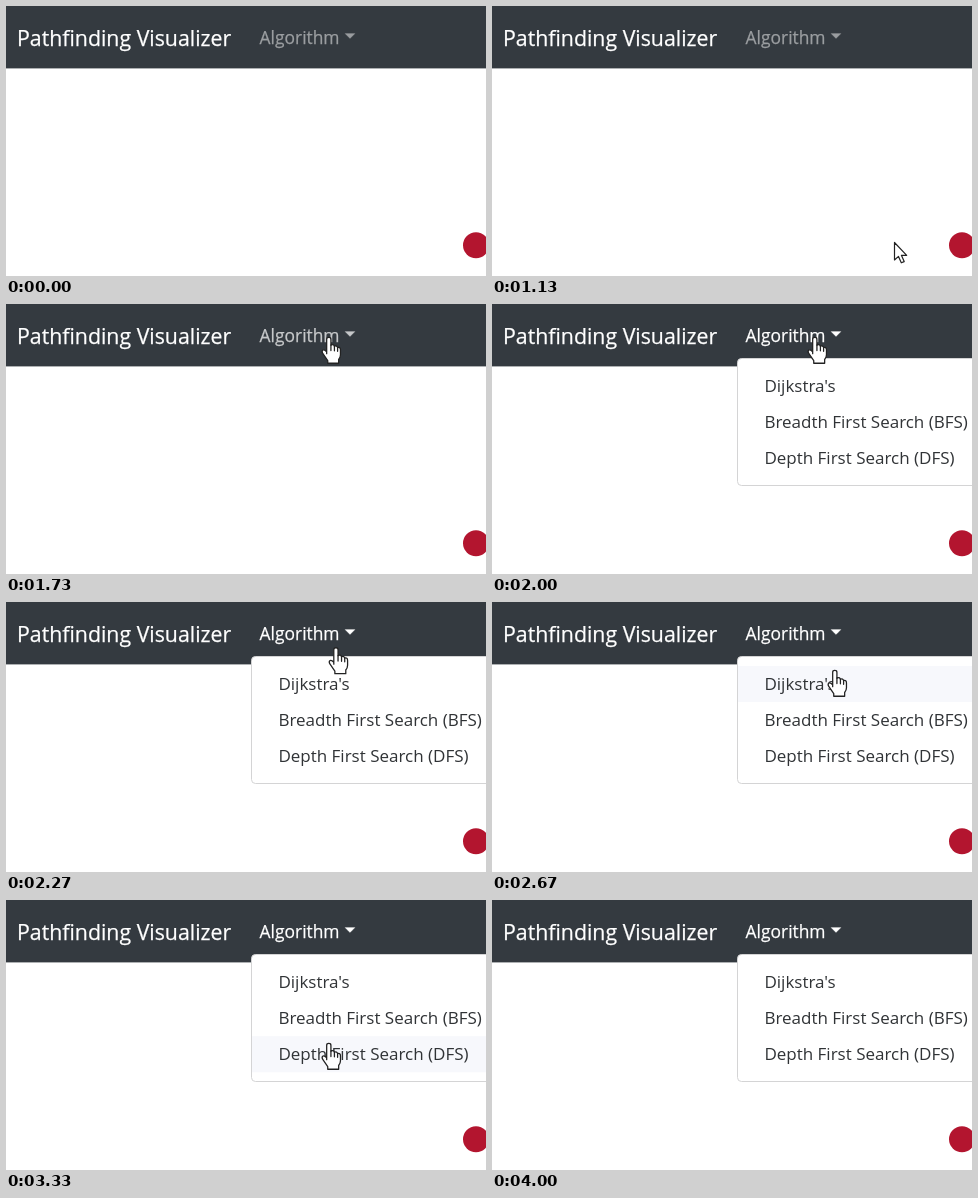
An HTML page that plays this animation: 480 px wide and 270 px high, repeating every 4070 ms.

```html
<!DOCTYPE html>
<html lang="en">
<head>
<meta charset="utf-8">
<title>Pathfinding Visualizer</title>
<style>
  html, body { margin: 0; width: 100%; height: 100%; overflow: hidden; background: #fff; }
  svg { display: block; width: 100%; height: 100%; font-family: "Open Sans", "Noto Sans", sans-serif; }
  .nav { fill: #fff; stroke: #fff; stroke-width: .25; }
  #menu text { font-size: 17px; fill: #303336; }
  #cursor { fill: #fff; stroke: #222; stroke-width: 1.2; stroke-linejoin: round; stroke-linecap: round; }
</style>
</head>
<body>
<svg viewBox="0 0 480 270">
  <rect width="480" height="62.4" fill="#343a40"/>
  <text class="nav" x="11" y="39.8" font-size="21.3">Pathfinding Visualizer</text>
  <g id="link" class="nav">
    <text x="253.6" y="37.8" font-size="17.4">Algorithm</text>
    <path d="M339 27.6h10l-5 5z"/>
  </g>
  <circle cx="470" cy="239.3" r="13" fill="#b3152f"/>
  <g id="menu">
    <rect x="245.5" y="54.5" width="250" height="127" rx="4" fill="#fff" stroke="#d4d4d5"/>
    <rect id="highlight" x="246" width="240" fill="#f7f8fc"/>
  </g>
  <g id="cursor">
    <path id="arrow" d="M.5.5V18l4-3.6 2.8 6.4 2.9-1.2-2.8-6.3h5.3z"/>
    <g id="hand" transform="translate(-.2 -1.2) scale(1.06)">
      <path d="M-2 15V1.5q0-2 2-2t2 2V7q2.5-1.5 3.3 1 2.4-1 3 1.2Q11 8.5 11 11.5V16q0 2.5-1.7 4.5V24H-1v-2.5l-4.7-6.7Q-7 12.5-5.5 11.5-4 10.8-2 13.3"/>
      <path fill="none" d="M2 7v5M5.3 8v4.3M8.3 9.2v3.6"/>
    </g>
  </g>
</svg>
<script>
const LOOP = 4070, STEP = 1000 / 15;
const ENTER = 1130, HOVER = 1600, SETTLE = 1730, OPEN = 2000, LEAVE = 3930;
const MENU_TOP = 64, ROW_HEIGHT = 36.1;
const LABELS = ["Dijkstra's", "Breadth First Search (BFS)", "Depth First Search (DFS)"];

// The pointer eases from stop to stop
const stops = [
  { at: ENTER, x: 402, y: 236 },
  { at: HOVER, x: 326, y: 17 },
  { at: SETTLE, x: 323, y: 35 },
  { at: OPEN, x: 323, y: 35 },
  { at: 2670, x: 343, y: 70 },
  { at: 3330, x: 323, y: 145 },
  { at: LEAVE, x: 322, y: 171 }
];

const el = id => document.getElementById(id);
const link = el("link"), menu = el("menu"), highlight = el("highlight");
const cursor = el("cursor"), arrow = el("arrow"), hand = el("hand");

const show = (node, visible) => { node.style.display = visible ? "" : "none"; };
const progress = (t, from, to) => Math.max(0, Math.min(1, (t - from) / (to - from)));
const ease = p => p * p * (3 - 2 * p);
const mix = (a, b, p) => a + (b - a) * p;

highlight.setAttribute("height", ROW_HEIGHT);
LABELS.forEach((label, row) => {
  const text = document.createElementNS("http://www.w3.org/2000/svg", "text");
  text.textContent = label;
  text.setAttribute("x", 272.4);
  text.setAttribute("y", MENU_TOP + 24.2 + row * ROW_HEIGHT);
  menu.append(text);
});

function pointerAt(t) {
  const next = stops.findIndex(stop => stop.at > t);
  const i = next < 0 ? stops.length - 1 : Math.max(1, next);
  const a = stops[i - 1], b = stops[i];
  const p = ease(progress(t, a.at, b.at));
  return [mix(a.x, b.x, p), mix(a.y, b.y, p)];
}

function draw(time) {
  // Motion advances 15 times per second, on times rounded to 10 ms
  const step = Math.floor((time % LOOP + 5) / STEP);
  const t = Math.round(step * STEP / 10) * 10;
  const present = t >= ENTER && t < LEAVE, open = t >= OPEN;
  const [x, y] = pointerAt(t);
  const row = Math.floor((y - MENU_TOP) / ROW_HEIGHT);
  const overRow = open && present && row in LABELS;
  const overLink = t >= HOVER && y < 54;

  link.setAttribute("opacity", open ? 1 : mix(0.5, 0.72, progress(t, HOVER, SETTLE)));
  show(menu, open);
  show(highlight, overRow);
  highlight.setAttribute("y", MENU_TOP + row * ROW_HEIGHT);
  show(cursor, present);
  show(hand, overRow || overLink);
  show(arrow, !overRow && !overLink);
  cursor.setAttribute("transform", `translate(${x} ${y})`);
}

const start = performance.now();
function frame() {
  draw(performance.now() - start);
  requestAnimationFrame(frame);
}
frame();
</script>
</body>
</html>
```
